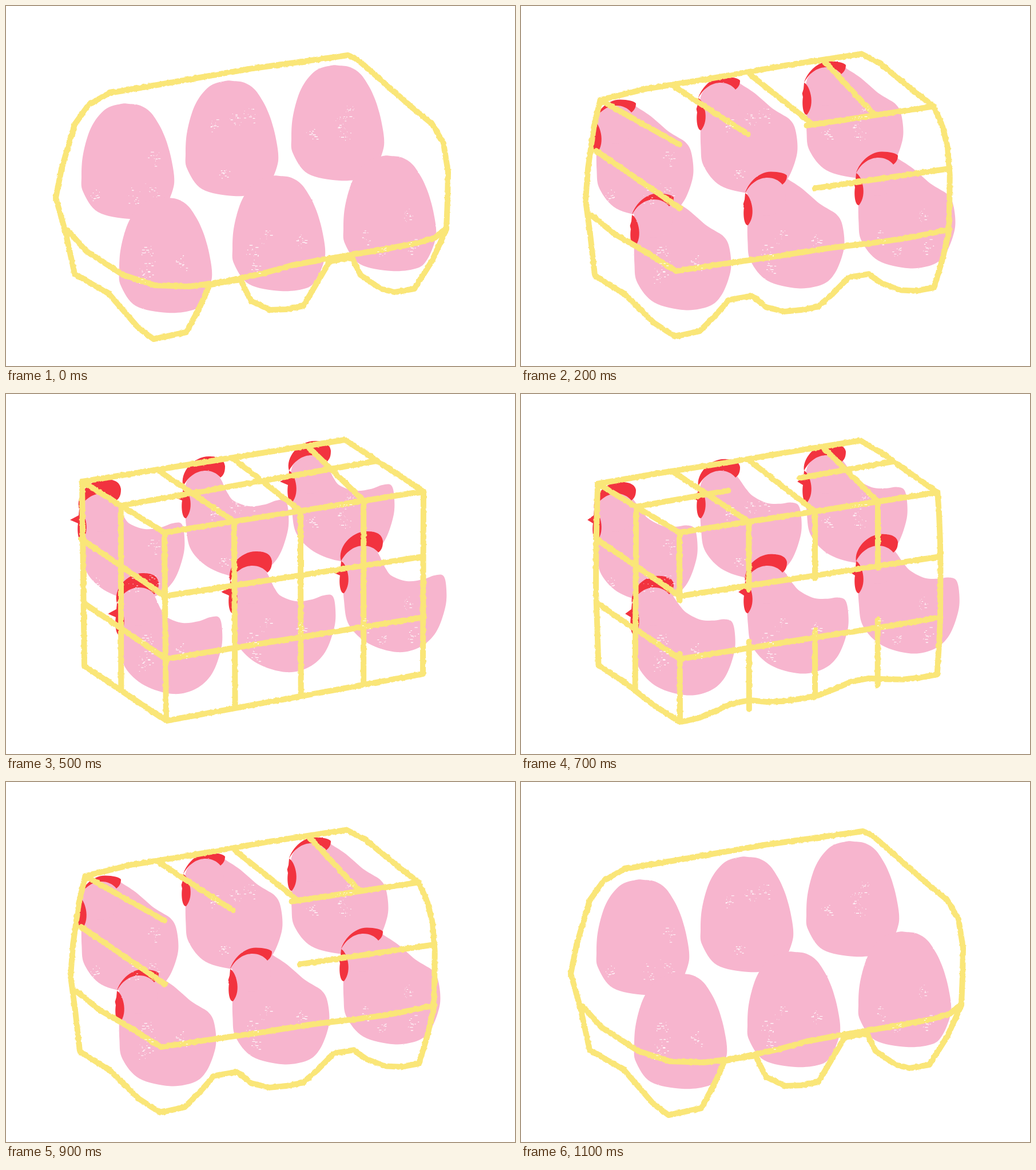
These frames come from a looping animation (890x629 px, 1400 ms). An HTML page:

```html
<!DOCTYPE html>
<html lang="en">
<head>
<meta charset="utf-8">
<title>Eggs to hens</title>
<style>
  html, body { margin: 0; width: 100%; height: 100%; overflow: hidden; background: #fff; }
  svg { display: block; width: 100%; height: 100%; }
  .cage { fill: none; stroke: #fae678; stroke-width: 10; stroke-linejoin: round; stroke-linecap: round; }
</style>
</head>
<body>
<svg id="stage" viewBox="0 0 890 629"></svg>
<script>
const BEAT = 100, BEATS = 14, LAST = 5;
const points = text => text.split(" ").map(p => p.split(",").map(Number));
const clamp = v => Math.max(0, Math.min(1, v));
const lerp = (a, b, wx, wy = wx) => [a[0] + (b[0] - a[0]) * wx, a[1] + (b[1] - a[1]) * wy];

// Birds: the egg outline morphs point by point into the hen's.
const SPOTS = points("131,170 313,130 498,103 197,334 395,296 589,261");
const EGG = points("18,42 42,11 70,1 84,1 104,4 122,16 137,38 146,57 152,74 158,97 163,128 161,150 148,181 130,197 85,202 30,190 4,155 1,128 4,88");
const HEN = points("10,14 34,3 55,8 64,22 75,44 86,57 112,66 140,63 160,56 176,57 181,80 179,112 163,155 135,181 95,190 45,175 11,143 2,100 0,37");

// Smooth closed curve through the points.
function loop(list) {
  const at = i => list[(i + list.length) % list.length];
  const handle = (p, from, to) => [p[0] + (to[0] - from[0]) / 6, p[1] + (to[1] - from[1]) / 6];
  return "M" + at(0) + list.map((p, i) => {
    const next = at(i + 1);
    return `C${handle(p, at(i - 1), next)} ${handle(next, at(i + 2), p)} ${next}`;
  }).join("") + "Z";
}

function comb(t) {
  const top = 3 - 24 * t;
  return `M-3 31C${7 - 17 * t} ${23 - 15 * t} ${21 - 7 * t} ${top} 42 ${top}
    C56 ${top} 68 ${top + 3} 70 ${3 - 7 * t}C70 8 67 12 62 16C48 -2 14 -2 -3 31Z`;
}

const wattle = t => `M-3 31C6 34 18 68 2 87C-5 88 -7 68 -5 56L${2 - 21 * t} 50L-4 42Z`;

function flock(t) {
  const body = loop(EGG.map((p, i) => lerp(p, HEN[i], t)));
  const shift = 50 * Math.max(0, .4 - t);
  const head = content => t ? `<g transform="translate(${shift} ${shift})">${content}</g>` : "";
  const layer = (fill, content) => `<g fill="${fill}" filter="url(#soft)">` +
    SPOTS.map(([x, y]) => `<g transform="translate(${x} ${y})">${content}</g>`).join("") + "</g>";
  return layer("#f7b5ce", `<path d="${body}"/>` + head(`<circle cx="34" cy="37" r="34"/>`)) +
    layer("#f2333f", head(`<path d="${comb(t)}${wattle(t)}"/>`));
}

// Carton outline, split where the corners of the wire box will be.
const CORNERS = points("133,153 593,80 730,170 729,489 280,571 137,475");
const CARTON = [
  "145,172 181,152 270,137 425,110",
  "598,86 614,93 670,142",
  "712,179 745,206 765,240 773,290 772,340 770,390 745,445",
  "714,494 680,500 655,494 620,470 605,440 566,446 540,490 520,524 490,530 462,531 428,515 410,478 357,486 337,530 315,570",
  "258,582 232,563 180,503",
  "120,468 104,395 87,335 97,285 120,207"
].map(points);
const BAND = ["108,392 140,428 205,470", "260,488 320,490 380,482 450,467 500,453 555,443 650,427 715,415 750,405", "770,388"].map(points);
const BAND_ENDS = points("137,366 280,463 730,390");
const FRONT = [277, 242];

// Spreads a run of points evenly along the straight edge from a to b.
const straighten = (run, a, b, wx, wy) => run.map((p, i) => lerp(p, lerp(a, b, i / run.length), wx, wy));

function cage(t) {
  const wx = 1 - (1 - t) ** 1.5;
  const edges = CARTON.map((run, i) => straighten(run, CORNERS[i], CORNERS[(i + 1) % 6], wx, t));
  const band = BAND.map((run, i) => straighten(run, BAND_ENDS[i], BAND_ENDS[i + 1] || BAND_ENDS[i], wx, clamp(2.5 * t)));
  let d = `M${edges.flat().join(" ")}ZM${band.flat().join(" ")}`;

  const grow = (a, b, reach) => { if (reach > 0) d += `M${a}L${lerp(a, b, clamp(reach))}`; };
  const meet = (a, b, reach) => { grow(a, b, reach); grow(b, a, reach); };
  const [backLeft, backRight, right, rightFoot, frontFoot, leftFoot] = edges.map(run => run[0]);
  const early = 2.5 * t, steady = 1.25 * t, late = 2.5 * (t - .4), closing = .9 * (t - .4);

  for (let i = 0; i < 4; i++) {
    const u = i / 4, f = u * (1.1 - .1 * u);
    const top = lerp(FRONT, right, f);
    grow(lerp(backLeft, backRight, 1.14 * u), top, early);
    meet(top, lerp(frontFoot, rightFoot, f), closing);
  }
  const middle = lerp(backLeft, FRONT, .47);
  grow(right, FRONT, steady);
  grow([edges[2][3][0], 284], [278, 353], steady);
  grow([131, 253], [278, 353], early);
  grow(middle, lerp(leftFoot, frontFoot, .45), late);
  meet(middle, lerp(backRight, right, .41), closing);
  return `<path class="cage" filter="url(#rough)" d="${d}"/>`;
}

// Worn patches of print, scattered over each bird.
let seed = 7;
const random = () => (seed = seed * 16807 % 2147483647) / 2147483647;
const around = (v, size) => v + (random() + random() - 1) * size;

function specks() {
  let d = "";
  for (const [x, y] of SPOTS) {
    for (let patch = 0; patch < 4; patch++) {
      const cx = x + 25 + random() * 110, cy = y + 50 + random() * 120;
      for (let k = 0; k < 14; k++) d += `M${around(cx, 12)} ${around(cy, 16)}h${.6 + random() ** 3 * 5}`;
    }
  }
  return `<path d="${d}" fill="none" stroke="#fff" stroke-width="1.1"/>`;
}

const edge = (id, size) => `<filter id="${id}" filterUnits="userSpaceOnUse" x="0" y="0" width="890" height="629"
  color-interpolation-filters="sRGB"><feTurbulence type="fractalNoise" baseFrequency=".16" numOctaves="2" seed="4"/>
  <feDisplacementMap in="SourceGraphic" scale="${size}" xChannelSelector="R" yChannelSelector="G"/></filter>`;

let scene = edge("soft", 1.5) + edge("rough", 3.5);
for (let i = 0; i <= LAST; i++) scene += `<g class="pose">${flock(i / LAST)}${cage(i / LAST)}</g>`;
const stage = document.getElementById("stage");
stage.innerHTML = scene + specks();
const poses = [...stage.querySelectorAll(".pose")];

function draw() {
  const beat = Math.floor(performance.now() / BEAT) % BEATS;
  const now = Math.max(0, Math.min(beat, LAST, 2 * LAST + 1 - beat));
  poses.forEach((g, i) => g.style.display = i === now ? "" : "none");
  requestAnimationFrame(draw);
}
draw();
</script>
</body>
</html>
```
